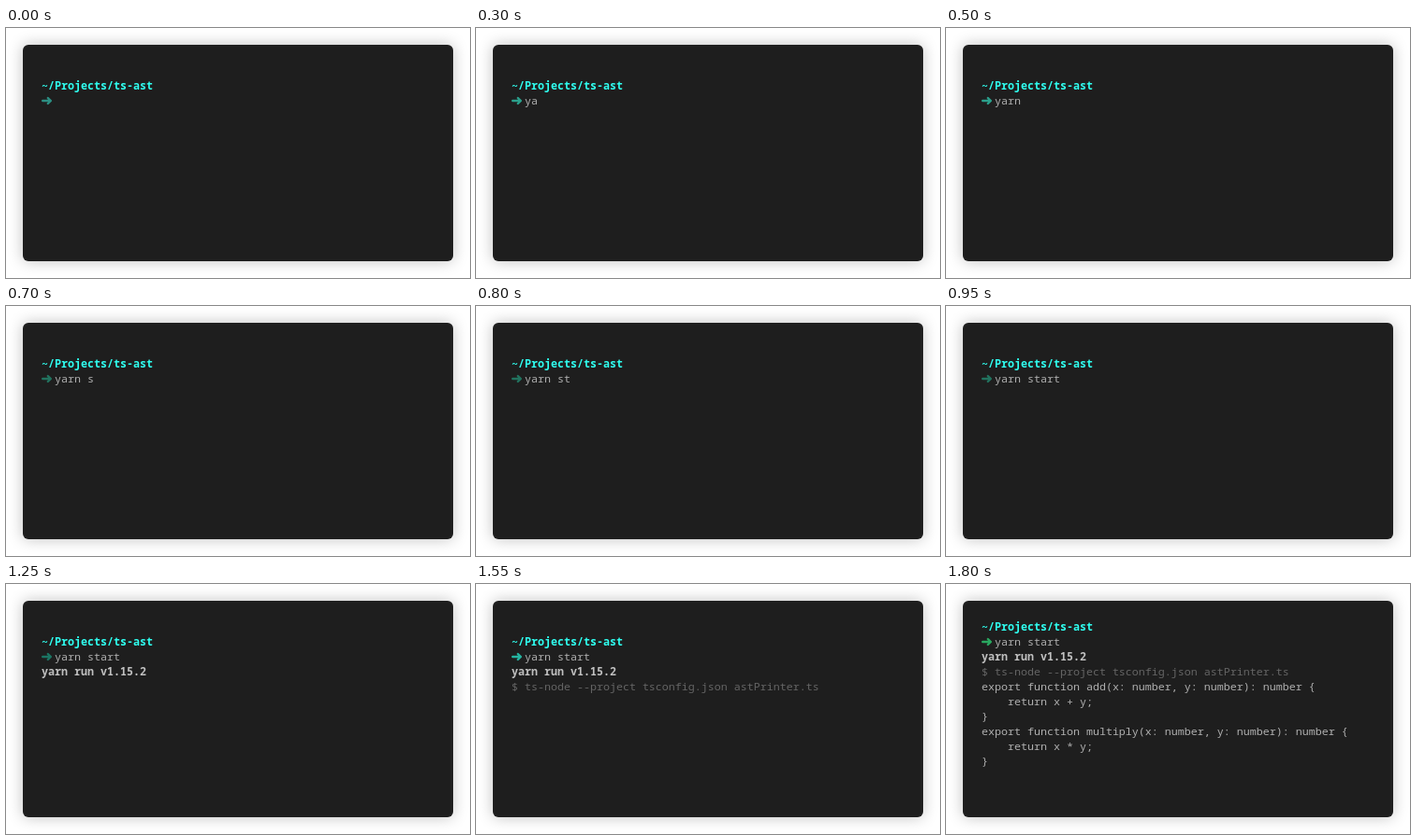
Write an HTML page that moves like this. It is 496 px wide and 268 px high and loops after 4.09 s.

```html
<!DOCTYPE html>
<html lang="en">
<head>
<meta charset="utf-8">
<title>Terminal</title>
<style>
  html, body { margin: 0; width: 100%; height: 100%; overflow: hidden; background: #fff; }
  #term {
    position: absolute; left: 18px; top: 18px; width: 460px; height: 232px;
    border-radius: 6px; background: #1e1e1e; box-shadow: 0 0 16px rgba(0, 0, 0, .25);
  }
  #screen {
    position: absolute; left: 20px; top: 36px; color: #b0b0b0;
    font: 11.667px/16px "Noto Sans Mono", monospace;
  }
  #screen div { white-space: pre; min-height: 16px; }
  #screen .path { color: #2ffff0; font-weight: 600; }
  #screen .head { color: #c0c0c0; font-weight: 600; }
  #screen .dim { color: #656565; }
  #prompt { position: relative; padding-left: 14px; }
  svg { position: absolute; left: 0; top: 0; fill: none; stroke-width: 2.4; stroke-linecap: round; stroke-linejoin: round; }
</style>
</head>
<body>
<div id="term">
  <div id="screen">
    <div class="path">~/Projects/ts-ast</div>
    <div id="prompt"><svg width="13" height="16"><path d="M1.2 8H9.5M6.8 5L9.9 8L6.8 11"/></svg><span id="typed"></span></div>
    <div class="head out" data-at="1250">yarn run v1.15.2</div>
    <div class="dim out" data-at="1550">$ ts-node --project tsconfig.json astPrinter.ts</div>
    <div class="out" data-at="1800">export function add(x: number, y: number): number {
    return x + y;
}
export function multiply(x: number, y: number): number {
    return x * y;
}</div>
  </div>
</div>
<script>
  const LOOP = 4090;
  const COMMAND = "yarn start";
  // Time of each keystroke; the space arrives together with the "s".
  const KEYS = [200, 300, 400, 500, 700, 700, 800, 850, 900, 950];
  const ARROW = [
    [0, "#2c8f83"], [200, "#2ba08c"], [700, "#22735f"],
    [1250, "#1b7563"], [1550, "#25b5a1"], [1800, "#2aa860"]
  ];

  const screen = document.getElementById("screen");
  const typed = document.getElementById("typed");
  const arrow = document.querySelector("svg");
  const outputs = document.querySelectorAll(".out");

  function draw(t) {
    typed.textContent = COMMAND.slice(0, KEYS.filter(k => t >= k).length);
    arrow.style.stroke = ARROW.filter(([at]) => t >= at).pop()[1];
    for (const el of outputs) el.style.visibility = t >= +el.dataset.at ? "visible" : "hidden";
    screen.style.top = (t >= 1800 ? 20 : 36) + "px";
  }

  const start = performance.now();
  function tick() {
    draw((performance.now() - start) % LOOP);
    requestAnimationFrame(tick);
  }
  draw(0);
  requestAnimationFrame(tick);
</script>
</body>
</html>
```
